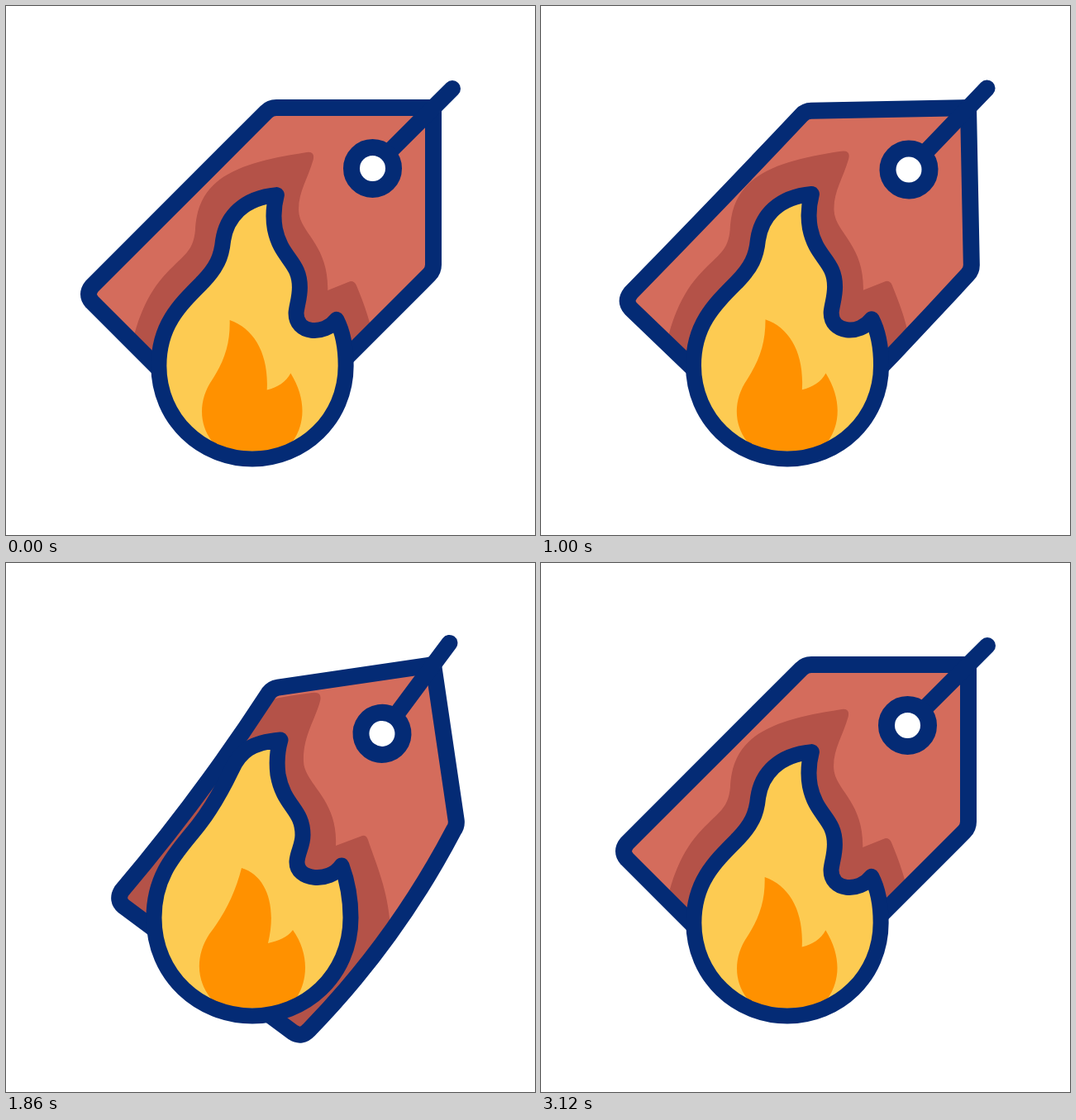
An HTML page that plays this animation: 640x640 px, repeating every 3.26 s.

```html
<!DOCTYPE html>
<html lang="en">
<head>
<meta charset="utf-8">
<title>Burning price tag</title>
<style>
  html, body { margin: 0; width: 100%; height: 100%; overflow: hidden; background: #fff; }
  svg { display: block; width: 100vw; height: 100vh; }
  .line { fill: none; stroke: #042b75; stroke-width: 20; stroke-linecap: round; stroke-linejoin: round; }
  .spark { fill: none; stroke: #fdcb52; stroke-width: 20; stroke-linecap: round; }
</style>
</head>
<body>
<svg viewBox="0 0 640 640">
  <defs><clipPath id="inside"><path id="clip"/></clipPath></defs>
  <path id="body" fill="#d46c5c"/>
  <g clip-path="url(#inside)"><path id="scorch" fill="#b45248"/></g>
  <path id="edge" class="line"/>
  <g id="cord">
    <path class="line" d="M443.5 196.5L540 100"/>
    <circle class="line" cx="443.5" cy="196.5" r="25.5" style="fill:#fff"/>
  </g>
  <path id="flame" fill="#fdcb52"/>
  <path id="core" fill="#ff9100"/>
  <path id="rim" class="line" style="stroke-width:19"/>
  <g id="sparks"></g>
</svg>
<script>
const LOOP = 3260;
const PIVOT = [517, 123];
const $ = id => document.getElementById(id);

// [time, value] pairs, eased in and out between neighbours
const SWING = [[200, 0], [730, -8.4], [1200, 3.3], [1330, 3.3], [1880, -8.4], [2460, 0]];
const HEAT = [[60, .35], [560, 1], [660, 1], [1260, 0], [1860, 1], [2460, 0], [3120, .35]];

// Each shape: calm pose, flared pose, flared pose while leaning
const FLAME = [
  'M327 237C288 241 268 263 264 290C262 310 257 322 240 340C212 367 188 390 188 438C188 500 238 548 298 548C358 548 408 500 408 438C408 418 405 400 397 385C383 404 349 402 350 375C351 366 354 358 354 346C354 314 332 312 325 277C322 262 323 250 327 237Z',
  'M328 213C288 216 265 238 260 272C258 293 250 307 235 322C207 352 179 378 179 430C179 500 235 548 298 548C361 548 417 500 417 430C417 407 413 385 405 369C390 390 352 388 353 363C354 352 358 343 358 330C358 298 334 295 326 256C324 240 325 228 328 213Z',
  'M332 214C297 217 283 228 273 250C261 275 250 295 233 317C208 349 179 375 179 429C179 500 235 548 298 548C361 548 417 500 417 429C417 405 413 385 406 366C391 388 351 384 352 361C353 349 359 342 359 329C359 297 336 295 329 256C327 240 328 228 332 214Z'
];
const CORE = [
  'M271 386C299 396 317 425 315 467C328 464 338 456 343 445C362 478 360 506 344 528C328 542 268 542 251 528C235 508 234 478 252 453C266 430 272 412 271 386Z',
  'M270 369C303 379 320 415 317 460C330 457 340 453 347 443C367 472 366 506 350 528C330 542 266 542 248 527C230 505 229 475 246 449C263 424 270 400 270 369Z',
  'M285 369C315 378 328 415 317 460C330 457 340 453 347 444C367 472 366 506 350 528C330 542 266 542 248 527C230 505 229 475 246 449C265 424 277 400 285 369Z'
];
const SCORCH = [
  'M155 420C162 385 175 350 200 325C222 302 229 300 231 275C233 215 285 201 358 188Q370 186 367 197C360 220 350 235 351 252C352 278 384 290 384 345L408 335Q413 334 416 339C426 360 432 380 437 402L420 450L298 560L160 450Z',
  'M140 430C145 385 160 345 185 318C206 296 222 290 225 265C228 185 290 167 370 157Q383 155 380 167C374 190 359 210 360 240C361 268 402 285 399 342L431 330Q436 329 438 335C448 365 462 395 465 440L430 600L298 640L150 460Z'
];

const SPARKS = [
  { start: 360, span: 240, d: 'M175 398L165 338' },
  { start: 1140, span: 240, d: 'M367 303L379 243' },
  { start: 2440, span: 300, d: 'M279 96C262 79 258 62 266 39' }
];
for (const s of SPARKS) {
  s.el = document.createElementNS('http://www.w3.org/2000/svg', 'path');
  s.el.setAttribute('class', 'spark');
  s.el.setAttribute('d', s.d);
  $('sparks').append(s.el);
  s.size = s.el.getTotalLength();
}

const clamp = v => Math.max(0, Math.min(1, v));

function track(keys, t) {
  if (t <= keys[0][0]) return keys[0][1];
  for (let i = 1; i < keys.length; i++) {
    const [t0, a] = keys[i - 1], [t1, b] = keys[i];
    if (t < t1) return a + (b - a) * (1 - Math.cos(Math.PI * (t - t0) / (t1 - t0))) / 2;
  }
  return keys[keys.length - 1][1];
}

// Blend two paths of the same structure number by number
function mix(a, b, k) {
  const nums = b.match(/[\d.]+/g);
  let i = 0;
  return a.replace(/[\d.]+/g, n => (+n + (nums[i++] - n) * k).toFixed(2));
}

// The long sides bow as the tag swings: the right one forward, the left one mostly back
function tagPath(angle) {
  const fore = Math.max(0, -angle), back = Math.max(0, angle);
  const left = fore * .8 - back * 4;
  const right = fore * 2;
  const sag = back * 2.2;
  const tail = fore * .3;
  return `M517 123L327 123Q320 123 315 128Q${209.5 + left} ${233.5 + left} 104 339Q96 349 104 358` +
    `Q${193 - sag} ${447 + sag} ${282 + tail} ${536 + tail}` +
    `Q${291 + tail} ${544 + tail} ${301 + tail} ${536 + tail}` +
    `Q${406.5 + right} ${430.5 + right} 512 325Q517 320 517 313Z`;
}

function drawSpark(s, t) {
  const u = (t - s.start) / s.span;
  const on = u > 0 && u < 1;
  s.el.style.display = on ? '' : 'none';
  if (!on) return;
  const head = clamp(u * 1.35) * s.size, tail = clamp(u * 1.35 - .35) * s.size;
  s.el.setAttribute('stroke-dasharray', `${Math.max(.1, head - tail)} 500`);
  s.el.setAttribute('stroke-dashoffset', -tail);
}

function draw(t) {
  const angle = track(SWING, t), heat = track(HEAT, t);
  const lean = clamp(-angle / 7.6);

  const turn = `rotate(${angle} ${PIVOT})`;
  const tag = tagPath(angle);
  for (const id of ['body', 'edge', 'clip']) {
    $(id).setAttribute('d', tag);
    $(id).setAttribute('transform', turn);
  }
  $('cord').setAttribute('transform', turn);

  const fire = mix(FLAME[0], mix(FLAME[1], FLAME[2], lean ** 3), heat);
  $('flame').setAttribute('d', fire);
  $('rim').setAttribute('d', fire);
  $('core').setAttribute('d', mix(CORE[0], mix(CORE[1], CORE[2], lean), heat));
  $('scorch').setAttribute('d', mix(SCORCH[0], SCORCH[1], heat));

  for (const s of SPARKS) drawSpark(s, t);
}

const begin = performance.now();
function tick() {
  draw((performance.now() - begin) % LOOP);
  requestAnimationFrame(tick);
}
tick();
</script>
</body>
</html>
```
